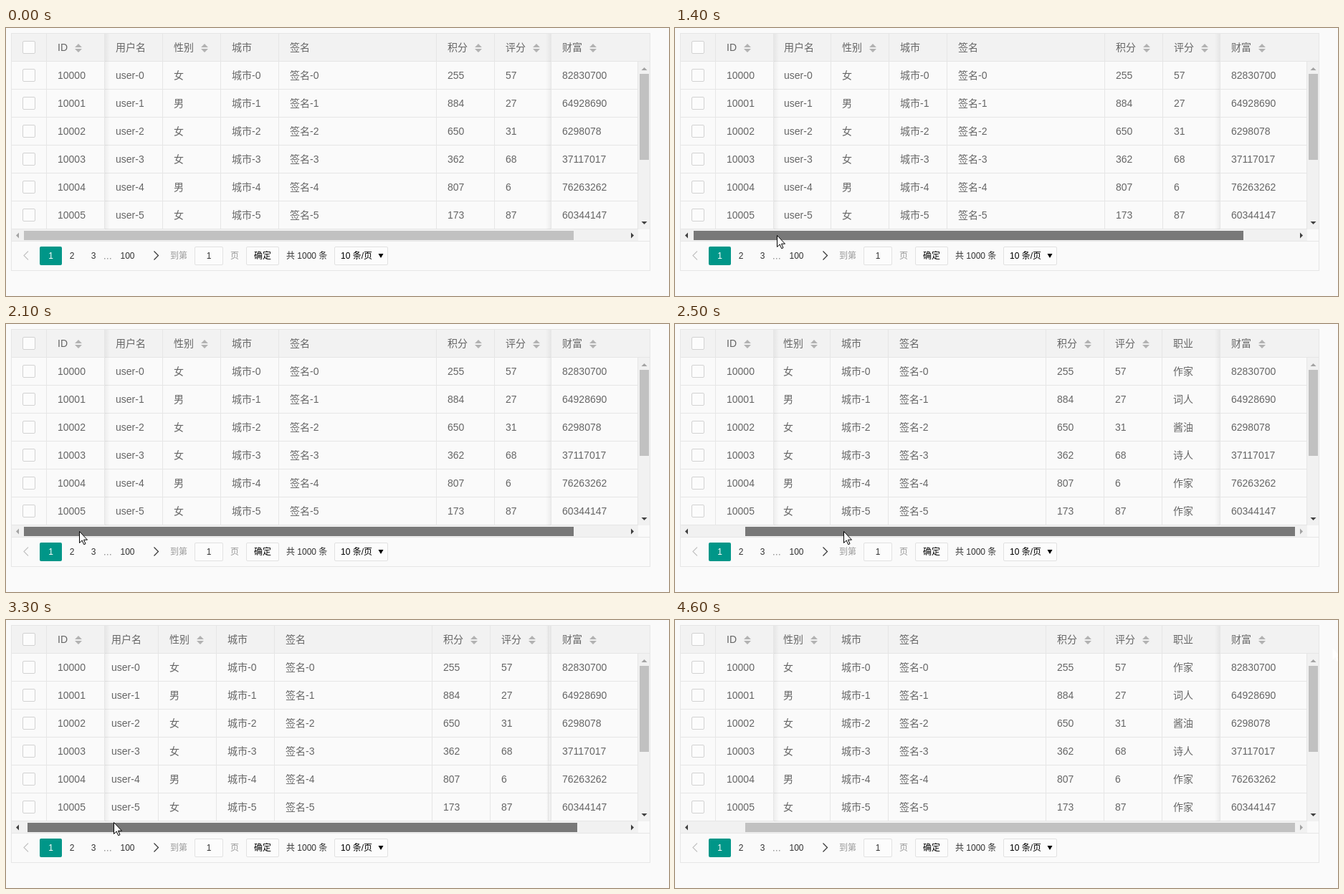
An HTML page that plays this animation: 925 px wide and 374 px high, repeating every 5200 ms.

```html
<!DOCTYPE html>
<html lang="zh">
<head>
<meta charset="utf-8">
<title>Table</title>
<style>
  html, body { margin: 0; width: 100%; height: 100%; overflow: hidden; background: #fafafa; }
  svg { display: block; width: 925px; height: 374px; font-family: "Liberation Sans", "Noto Sans CJK SC", "Noto Sans CJK", sans-serif; }
</style>
</head>
<body>
<svg id="stage" viewBox="0 0 925 374">
  <defs>
    <clipPath id="middle"><rect x="138" y="8" width="622" height="273"/></clipPath>
    <linearGradient id="shadeL"><stop stop-opacity=".05"/><stop offset="1" stop-opacity="0"/></linearGradient>
    <linearGradient id="shadeR"><stop stop-opacity="0"/><stop offset="1" stop-opacity=".05"/></linearGradient>
  </defs>
</svg>
<script>
const NS = 'http://www.w3.org/2000/svg';
const stage = document.getElementById('stage');
const LINE = '#e6e6e6', GREY = '#a3a3a3', DARK = '#404040';
const ROW = 39, BODY_TOP = 47;

function add(tag, attrs, parent = stage) {
  const el = document.createElementNS(NS, tag);
  for (const key in attrs) el.setAttribute(key, attrs[key]);
  return parent.appendChild(el);
}
const rect = (x, y, width, height, fill, parent) => add('rect', { x, y, width, height, fill }, parent);
const path = (d, fill, parent) => add('path', { d, fill }, parent);
const box = (x, y, width, height, stroke) => add('rect',
  { x: x + .5, y: y + .5, width: width - 1, height: height - 1, rx: 1.5, fill: '#fcfcfc', stroke });
function label(str, x, y, parent, size = 14, fill = '#666', anchor = 'start') {
  add('text', { x, y, fill, 'font-size': size, 'text-anchor': anchor }, parent).textContent = str;
}
function sortIcon(x, parent) {
  path(`M${x - 5} 27l5-5 5 5zM${x - 5} 29h10l-5 5z`, '#b2b2b2', parent);
}
function column(x, title, cells, sortable, parent) {
  label(title, x, 32, parent);
  if (sortable) sortIcon(x + (title === 'ID' ? 29 : 43), parent);
  cells.forEach((cell, i) => label(cell, x, 71 + i * ROW, parent));
}

const indexed = prefix => [0, 1, 2, 3, 4, 5].map(i => prefix + i);

// Backgrounds and grid
rect(8, 8, 890, 38, '#f2f2f2');
const hoverBand = rect(8, 0, 873, ROW - 1, '#f3f3f3');
for (let i = 0; i <= 6; i++) rect(8, 46 + i * ROW, i ? 873 : 890, 1, LINE);

// Scrolling columns
const clipped = add('g', { 'clip-path': 'url(#middle)' });
const content = add('g', {}, clipped);
[
  [153, 81, '用户名', indexed('user-')],
  [234, 81, '性别', [...'女男女女男女'], true],
  [315, 81, '城市', indexed('城市-')],
  [396, 220, '签名', indexed('签名-')],
  [616, 81, '积分', [255, 884, 650, 362, 807, 173], true],
  [697, 81, '评分', [57, 27, 31, 68, 6, 87], true],
  [778, 81, '职业', ['作家', '词人', '酱油', '诗人', '作家', '作家']]
].forEach(([x, width, title, cells, sortable]) => {
  column(x, title, cells, sortable, content);
  rect(x + width - 16, 8, 1, 272, LINE, content);
});

// Fixed columns
rect(138, 8, 7, 273, 'url(#shadeL)');
rect(753, 8, 7, 273, 'url(#shadeR)');
for (const x of [56, 137, 760]) rect(x, 8, 1, 272, LINE);
rect(881, 47, 1, 234, LINE);
for (let i = 0; i < 7; i++) box(23, 18 + i * ROW, 18, 18, '#d2d2d2');
column(72, 'ID', indexed('1000'), true);
column(776, '财富', [82830700, 64928690, 6298078, 37117017, 76263262, 60344147], true);

// Scrollbars
rect(882, 47, 16, 234, '#f1f1f1');
rect(884, 64, 13, 120, '#c1c1c1');
path('M886.5 59l4-4 4 4z', GREY);
path('M886.5 270h8l-4 4z', DARK);
rect(8, 281, 874, 16, '#f1f1f1');
const thumb = rect(25, 283, 767, 13, '#c1c1c1');
const arrowLeft = path('M18 285.5v8l-4-4z', GREY);
const arrowRight = path('M872 285.5v8l4-4z', DARK);

// Outer frame
rect(8, 297, 890, 1, LINE);
add('rect', { x: 7.5, y: 7.5, width: 891, height: 331, fill: 'none', stroke: LINE });

// Pager
const pager = (str, x, fill = '#333', anchor) => label(str, x, 322, stage, 12, fill, anchor);
const chevron = (d, stroke) => add('path', { d, stroke, fill: 'none', 'stroke-width': 1.2 });
chevron('M31 311.5l-6 6 6 6', '#c4c4c4');
chevron('M206.500 311.500l6 6-6 6', '#333');
add('rect', { x: 47, y: 305, width: 31, height: 26, rx: 2, fill: '#009688' });
pager('1', 62.5, '#fff', 'middle');
pager('2', 92, '#333', 'middle');
pager('3', 122, '#333', 'middle');
for (const x of [137, 141, 145]) rect(x, 321, 1.500, 1.500, '#999');
pager('100', 159.500);
pager('到第', 229, '#999');
box(263, 305, 40, 26, '#e2e2e2');
pager('1', 283, '#333', 'middle');
pager('页', 313, '#999');
box(335, 305, 46, 26, '#e2e2e2');
pager('确定', 358, '#000', 'middle');
pager('共 1000 条', 391);
box(458, 305, 75, 26, '#e2e2e2');
pager('10 条/页', 467, '#000');
path('M519.5 315h7l-3.500 6z', '#000');

// Pointer
const ARROW = 'M.5.5v16l3.700-3.500 2.500 5.700 2.300-1-2.500-5.500h5z';
const cursor = add('path', { d: ARROW, fill: '#fff', stroke: '#000' });
const ghost = add('path', { d: ARROW, fill: '#fff', transform: 'translate(917 39)' });

// time, x, y
const ROUTE = [
  [100, 795, 80], [300, 480, 135], [500, 235, 183], [600, 177, 209], [700, 150, 238],
  [800, 136, 261], [1000, 136, 280], [1200, 141, 287], [1400, 142, 289], [1500, 178, 290],
  [1700, 236, 292], [1900, 175, 290], [2100, 102, 289], [2300, 130, 289], [2500, 235, 289],
  [2700, 260, 284], [2900, 210, 281], [3100, 120, 282], [3300, 150, 282], [3500, 290, 281],
  [3700, 398, 280], [3900, 398, 280], [4500, 917, 39]
];
const LOOP = 5200, STEP = 100, GRAB_X = 141, MAX_SCROLL = 73, MAX_SHIFT = 83;

function pointerAt(t) {
  const next = ROUTE.findIndex(point => point[0] >= t);
  if (next <= 0) return ROUTE[next ? ROUTE.length - 1 : 0].slice(1);
  const [t0, x0, y0] = ROUTE[next - 1], [t1, x1, y1] = ROUTE[next];
  const k = (t - t0) / (t1 - t0);
  return [x0 + (x1 - x0) * k, y0 + (y1 - y0) * k];
}

function scrollAt(t) {
  if (t < 1400) return 0;
  // The page trails slightly behind the pointer
  const [x] = pointerAt(t - 30);
  return Math.max(0, Math.min(MAX_SCROLL, Math.round(x - GRAB_X)));
}

function hoveredRow(t) {
  const free = (t >= 200 && t < 1400) || (t >= 4100 && t < 4600);
  if (!free) return -1;
  const [x, y] = pointerAt(t - 100);
  const row = Math.floor((y - BODY_TOP) / ROW);
  return x < 881 && row < 6 ? row : -1;
}

const show = (el, on) => el.setAttribute('visibility', on ? 'visible' : 'hidden');

function render(t) {
  const [x, y] = pointerAt(t).map(Math.round);
  const visible = t >= 100 && t < 4600;
  show(cursor, visible);
  show(ghost, t >= 4600);
  cursor.setAttribute('transform', `translate(${x} ${y})`);

  const row = hoveredRow(t);
  show(hoverBand, row >= 0);
  hoverBand.setAttribute('y', BODY_TOP + row * ROW);

  const scroll = scrollAt(t);
  const dragging = t >= 1400 && t < 4000;
  const overThumb = visible && y >= 283;
  content.setAttribute('transform', `translate(${-Math.round(scroll * MAX_SHIFT / MAX_SCROLL)} 0)`);
  thumb.setAttribute('x', 25 + scroll);
  thumb.setAttribute('fill', dragging ? '#787878' : overThumb ? '#a8a8a8' : '#c1c1c1');
  arrowLeft.setAttribute('fill', scroll ? DARK : GREY);
  arrowRight.setAttribute('fill', scroll < MAX_SCROLL ? DARK : GREY);
}

const start = performance.now();
function tick() {
  const t = (performance.now() - start) % LOOP;
  render(Math.floor(t / STEP) * STEP);
  requestAnimationFrame(tick);
}
render(0);
requestAnimationFrame(tick);
</script>
</body>
</html>
```
